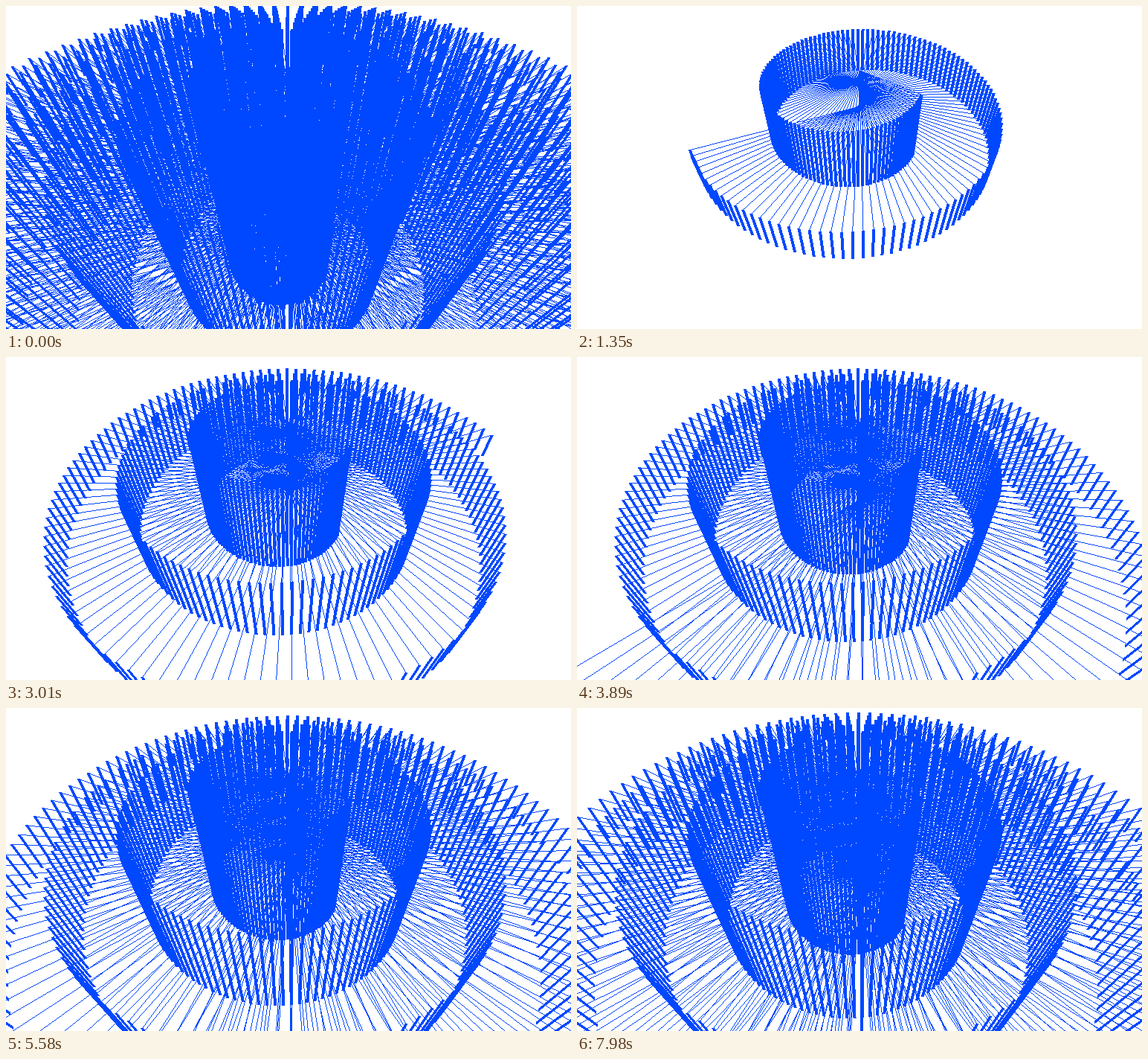
An HTML page with a canvas for the animation above (8 s loop, 760 px wide and 434 px high).

```html
<!DOCTYPE html>
<html lang="en">
<head>
<meta charset="utf-8">
<title>Spiral staircase</title>
<style>
  html, body { margin: 0; width: 760px; height: 434px; overflow: hidden; background: #fff; }
  canvas { display: block; }
</style>
</head>
<body>
<canvas id="stage" width="760" height="434"></canvas>
<script>
const W = 760, H = 434, LOOP = 8000;
const ctx = document.getElementById('stage').getContext('2d');
const image = ctx.createImageData(W, H);
const pixels = new Uint32Array(image.data.buffer);
const BLUE = 0xffff4800, WHITE = 0xffffffff;

// Camera, in units of the spiral's growth per turn
const FOCAL = 520, DISTANCE = 4.058, HEIGHT = 2.391;
const PITCH = Math.atan(1.1166), COS = Math.cos(PITCH), SIN = Math.sin(PITCH);

// Staircase: every stair turns by 3 degrees and sits a little lower
const PER_TURN = 120, FIRST = 102, FULL = 1315;
const DROP = 0.4156, BASE = 0.445, SIDE = 0.033;

// Time, newest stair, redraws since the previous key
const KEYS = [
  { t: 480, n: FIRST, redraws: 0 },
  { t: 1350, n: 263, redraws: 12 },
  { t: 3010, n: 443, redraws: 19 },
  { t: 4900, n: 572, redraws: 15 },
  { t: 6380, n: 659, redraws: 10 },
  { t: 7980, n: 731, redraws: 6 }
];

// Each redraw costs more as stairs pile up, so growth slows down
const POWER = 1.5;
const effort = n => (n - FIRST) ** POWER;

function stairAt(time) {
  if (time < KEYS[0].t) return FULL;
  let i = KEYS.length - 1;
  while (KEYS[i].t > time) i--;
  const from = KEYS[i], to = KEYS[i + 1];
  if (!to) return from.n;
  const k = Math.floor((time - from.t) / (to.t - from.t) * to.redraws) / to.redraws;
  const work = effort(from.n) + (effort(to.n) - effort(from.n)) * k;
  return Math.round(FIRST + work ** (1 / POWER));
}

const depthOf = r => HEIGHT + DROP * r;

function project(x, d, p) {
  const q = DISTANCE - d;
  const z = Math.max(0.05, q * COS + p * SIN);
  return [W / 2 + FOCAL * x / z, H / 2 + FOCAL * (p * COS - q * SIN) / z];
}

// Hard-edged line, widened across its minor axis
function line([x0, y0], [x1, y1], width) {
  const steep = Math.abs(y1 - y0) > Math.abs(x1 - x0);
  if (steep) [x0, y0, x1, y1] = [y0, x0, y1, x1];
  if (x0 > x1) [x0, y0, x1, y1] = [x1, y1, x0, y0];
  const major = steep ? H : W, minor = steep ? W : H;
  const slope = (y1 - y0) / (x1 - x0 || 1);
  const end = Math.min(major - 1, Math.round(x1));
  for (let a = Math.max(0, Math.round(x0)); a <= end; a++) {
    const b0 = Math.floor(y0 + (a - x0) * slope - (width - 1) / 2 + 0.5);
    for (let b = Math.max(0, b0); b < Math.min(minor, b0 + width); b++) {
      pixels[steep ? a * W + b : b * W + a] = BLUE;
    }
  }
}

function draw(last) {
  pixels.fill(WHITE);
  const floor = depthOf(last / PER_TURN) + BASE;
  // The very first stair stays hidden until a second one follows
  for (let n = FIRST; n <= last && last > FIRST; n++) {
    const r = n / PER_TURN, angle = r * 2 * Math.PI;
    const sin = Math.sin(angle), cos = Math.cos(angle);
    const x = SIDE * cos - r * sin, d = r * cos + SIDE * sin, p = depthOf(r);
    const top = project(x, d, p);
    line(project(0, 0, p), top, 1);
    line(top, project(x, d, floor), 4);
  }
  ctx.putImageData(image, 0, 0);
}

let shown = -1;
const start = performance.now();
function tick() {
  const last = stairAt(Math.max(0, performance.now() - start) % LOOP);
  if (last !== shown) draw(shown = last);
  requestAnimationFrame(tick);
}
tick();
</script>
</body>
</html>
```
